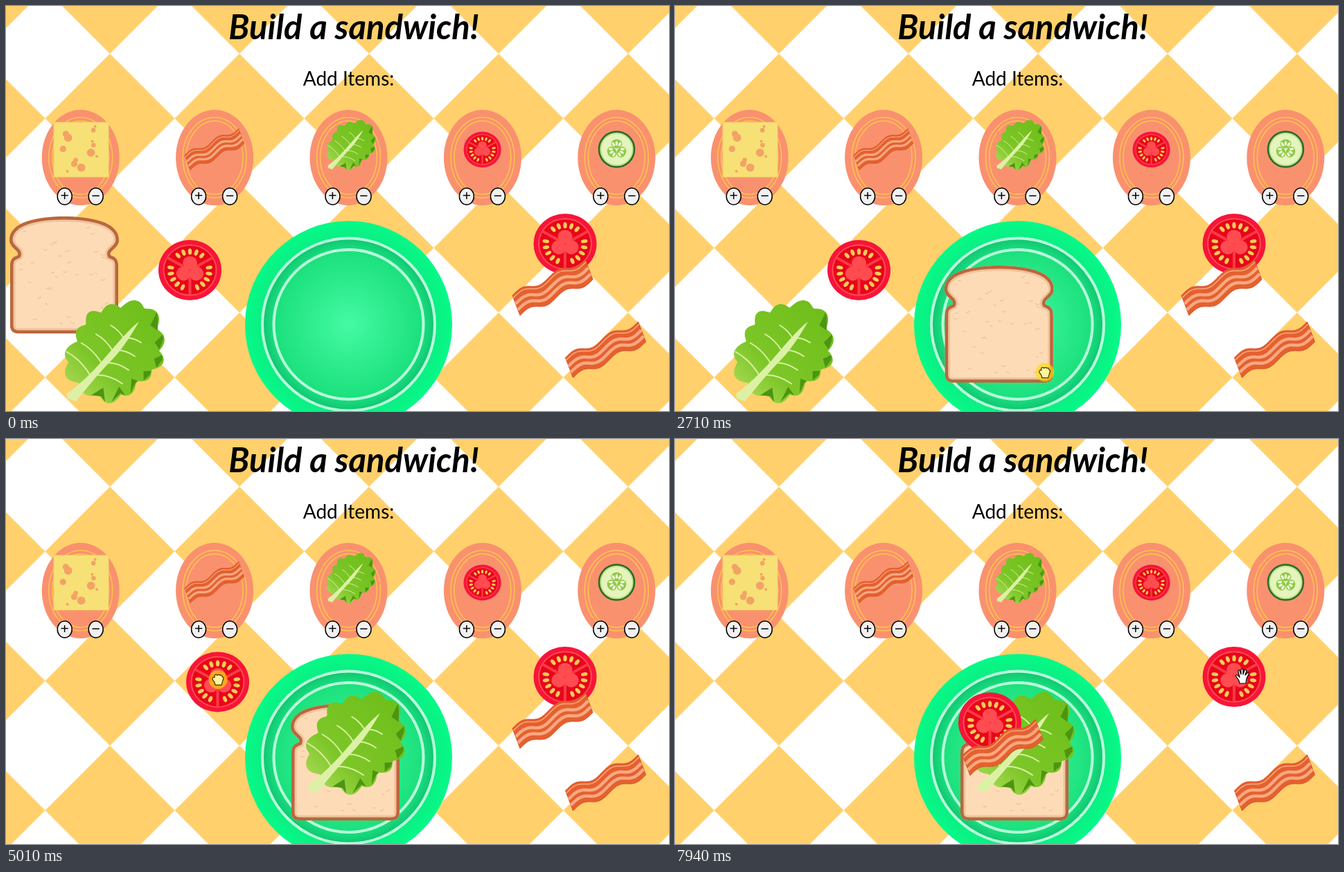
Recreate the animation shown at these times as an HTML page. Size 957x585 px, loop 8 s.

```html
<!DOCTYPE html>
<html lang="en">
<head>
<meta charset="utf-8">
<title>Build a sandwich!</title>
<style>
  html, body { margin: 0; width: 100%; height: 100%; overflow: hidden; background: #fff; }
  svg { display: block; width: 100%; height: 100%; }
  text { font-family: Lato, "Open Sans", sans-serif; text-anchor: middle; }
  .title { font-size: 49px; font-weight: 700; font-style: italic; }
  .sub { font-size: 28px; }
  .sign { font: 21px "Liberation Sans", Arial, sans-serif; }
</style>
</head>
<body>
<svg viewBox="0 0 957 585">
  <defs>
    <pattern id="tiles" x="56.5" y="68.9" width="187" height="187" patternUnits="userSpaceOnUse">
      <path d="M93.5 0L187 93.5 93.5 187 0 93.5Z" fill="#ffd06b"/>
    </pattern>
    <radialGradient id="rim">
      <stop offset=".84" stop-color="#0cee83"/>
      <stop offset="1" stop-color="#05fa88"/>
    </radialGradient>
    <radialGradient id="band">
      <stop offset=".86" stop-color="#19e07f"/>
      <stop offset="1" stop-color="#10c571"/>
    </radialGradient>
    <radialGradient id="dish">
      <stop offset="0" stop-color="#45faa4"/>
      <stop offset="1" stop-color="#1be07c"/>
    </radialGradient>
    <linearGradient id="leafFill" x1="0" y1="1" x2="1" y2="0">
      <stop offset="0" stop-color="#b5df62"/>
      <stop offset=".35" stop-color="#7dc628"/>
      <stop offset="1" stop-color="#6cbd18"/>
    </linearGradient>
    <path id="loaf" d="M79 0C118 0 158 8 158 34C158 46 143 49 146 56C154 59 157 62 157 72V157Q157 169 145 169H13Q1 169 1 157V72C1 62 4 59 12 56C15 49 0 46 0 34C0 8 40 0 79 0Z"/>
    <clipPath id="loafClip"><use href="#loaf"/></clipPath>

    <g id="bread">
      <g clip-path="url(#loafClip)">
        <use href="#loaf" fill="#fddbb6" stroke="#efc39c" stroke-width="15"/>
        <use href="#loaf" fill="none" stroke="#b9673f" stroke-width="9"/>
      </g>
      <path id="crumbs" fill="none" stroke="#e9c596" stroke-width="1.2" stroke-linecap="round"/>
    </g>

    <g id="lettuce">
      <path id="leaf" fill="url(#leafFill)"/>
      <path id="folds" fill="#4d9412"/>
      <path id="veins" fill="none" stroke="#d9f0a2" stroke-width="2" stroke-linecap="round"/>
      <path d="M2 132Q30 112 62 74T106 28Q84 66 66 84T15 143L3 139Z" fill="#dcf1a6"/>
    </g>

    <g id="bacon">
      <path id="rasher" fill="#e5602f" stroke="#d85429"/>
      <g id="fat" fill="none" stroke="#f8a881"/>
    </g>

    <g id="tomato">
      <ellipse cx="45.5" cy="43.5" rx="45.5" ry="43.5" fill="#f8143a"/>
      <g id="flesh" transform="translate(45.5 43.5) scale(1 .956)">
        <circle r="39" fill="#ff4c50"/>
        <circle r="37" fill="#e8061c"/>
      </g>
    </g>

    <g id="cheese">
      <rect width="79" height="79" fill="#f7e176" stroke="#f5d264"/>
      <g id="holes" fill="#f3a365"/>
    </g>

    <g id="cucumber" transform="translate(27.5 26.5)">
      <circle r="25.5" fill="#b9dc7c" stroke="#286b28" stroke-width="2.5"/>
      <circle r="22.5" fill="#e4f4bd"/>
      <g id="pips"/>
    </g>

    <path id="open" fill="#fff" stroke="#000" stroke-width="1.2" stroke-linejoin="round" d="M-4 11L-5 7-9 1Q-10-2-7-1L-4 2-6-6Q-6-9-4-8L-2-2-2-9Q-1-11 1-9L1-2 3-8Q5-10 6-7L4-1 7-4Q10-5 9-2L6 4 5 11Z"/>
    <g id="fist">
      <circle r="13.5" fill="#ffde00" fill-opacity=".62"/>
      <path fill="#fff3a0" stroke="#3b3000" stroke-width="1.2" stroke-linejoin="round" d="M-4 8L-5 4-8 0Q-8-4-5-3L-5-6Q-3-8-1-6Q1-8 3-6Q6-7 6-4Q9-3 7 1L5 8Z"/>
    </g>
    <path id="arrow" fill="#fff" stroke="#000" d="M0 0V16L4 12.5 7 19 10 18 7 11.5H12Z"/>
  </defs>

  <rect width="957" height="585" fill="#fff"/>
  <rect width="957" height="585" fill="url(#tiles)"/>
  <text class="title" x="502" y="48">Build a sandwich!</text>
  <text class="sub" x="494.5" y="115">Add Items:</text>
  <g id="trays"></g>
  <g transform="translate(494.5 460)" fill="none" stroke="#b9fddb" stroke-width="4">
    <circle r="149.5" fill="url(#rim)" stroke="none"/>
    <circle r="124.5" fill="url(#band)"/>
    <circle r="108" fill="url(#dish)"/>
  </g>
  <g id="food"></g>
  <g id="cursor"><use/></g>
</svg>
<script>
const $ = id => document.getElementById(id);
const fill = (id, html) => $(id).insertAdjacentHTML('beforeend', html);
const shape = (id, d) => $(id).setAttribute('d', d);
const repeat = (n, make) => Array.from({ length: n }, (_, i) => make(i)).join('');
const line = (n, point) => 'M' + Array.from({ length: n + 1 }, (_, i) => point(i / n).map(v => v.toFixed(1))).join('L');

let seed = 11;
const rand = (min, max) => {
  seed = seed * 16807 % 2147483647;
  return min + seed / 2147483647 * (max - min);
};

// Bread and cheese
shape('crumbs', repeat(36, () =>
  `M${rand(14, 138)} ${rand(14, 154)}q${rand(1, 3)} ${rand(1, 4)} ${rand(3, 6)} ${rand(-2, 2)}`));
fill('holes', repeat(13, i => `<circle cx="${rand(7, 72)}" cy="${6 + i * 5.4}" r="${2 + i * 5 % 4 * 1.3}"/>`));

// Lettuce: a scalloped outline, longest along the stem's diagonal
const leafPoint = (angle, scale = 1) => {
  const r = scale * (63 + 8 * Math.cos(2 * angle + Math.PI / 2) + 9 * Math.abs(Math.sin(6.5 * angle)) + 3 * Math.sin(5 * angle));
  return [72 + r * Math.cos(angle), 70 + r * Math.sin(angle)];
};
shape('leaf', line(160, k => leafPoint(k * 2 * Math.PI)) + 'Z');
shape('folds', repeat(7, i => {
  const a = i * .42 - .75;
  return `M${leafPoint(a)}L${leafPoint(a + .1, .97)} ${leafPoint(a + .3, .98)} ${leafPoint(a + .12, .8)}Z`;
}));
shape('veins', repeat(4, i => {
  const x = 36 + i * 16, y = 106 - i * 18, reach = 46 - i * 7;
  return `M${x} ${y}q${-reach * .3} ${-reach * .5} ${-reach * .75} ${-reach * .75}` +
    `M${x} ${y}q${reach * .5} ${-reach * .1} ${reach} ${reach * .25}`;
}));

// Bacon: waves running along a slanted strip, v across it
const wave = v => u => [105 * u + 11 * v, 52 * (1 - u) + 29 * v - 4.5 * Math.sin(4 * Math.PI * u)];
shape('rasher', line(30, wave(0)) + line(30, u => wave(1)(1 - u)).replace('M', 'L') + 'Z');
fill('fat', repeat(3, i => `<path d="${line(30, wave(.12 + i * .3))}" stroke-width="${i ? 4.5 : 1.5}"/>`));

// Tomato and cucumber share a threefold pattern
const thirds = make => repeat(3, i => `<g transform="rotate(${i * 120})">${make()}</g>`);
const fan = (n, step, radius, rx, ry, color) => repeat(n, i =>
  `<ellipse cy="${-radius}" rx="${rx}" ry="${ry}" fill="${color}" transform="rotate(${(i - (n - 1) / 2) * step})"/>`);
fill('flesh', thirds(() => `<path d="M0 0L-32.5 -18.8" stroke="#fb3a45" stroke-width="4"/>`) +
  thirds(() => `<ellipse cy="-11" rx="10.5" ry="10" fill="#ff4c50"/>` + fan(5, 19, 28, 2.7, 4.8, '#f7cb58')));
fill('pips', thirds(() => `<ellipse cy="-8" rx="8" ry="6.5" fill="#8fc94a"/>` + fan(3, 32, 8.5, 1.7, 3.2, '#f2fad8')));

// Trays: ingredient, top left corner, scale
const trays = [['cheese', 69, 168, 1], ['bacon', 258, 177, .74], ['lettuce', 463.5, 166, .49],
  ['tomato', 660.5, 181.5, .595], ['cucumber', 854, 180.5, 1]];
const button = (x, sign) => `<ellipse cx="${x}" cy="275" rx="10.5" ry="12" fill="#f1f1f1" stroke="#000" stroke-width="1.5"/>
  <text class="sign" x="${x}" y="281">${sign}</text>`;
fill('trays', trays.map(([name, x, y, scale], i) => {
  const cx = 107.7 + i * 193.4;
  const ring = (rx, ry, paint) => `<ellipse cx="${cx}" cy="219" rx="${rx}" ry="${ry}" ${paint}/>`;
  const thin = 'fill="none" stroke="#ffc44f" stroke-width="1.5"';
  return ring(56, 69, 'fill="#f9916f"') + ring(46, 58, thin) + ring(41, 53, thin) +
    `<use href="#${name}" transform="translate(${x} ${y}) scale(${scale})"/>` +
    button(cx - 23, '+') + button(cx + 22, '−');
}).join(''));

// Loose food, bottom to top
const item = (name, x, y, w, h) => ({ name, x, y, w, h });
const bread = item('bread', 5, 304, 158, 169);
const lettuce = item('lettuce', 86, 428, 142, 143);
const tomato = item('tomato', 220, 338, 91, 87);
const bacon = item('bacon', 731, 366, 116, 81);
const items = [bread, lettuce, tomato, { ...tomato, x: 761.5, y: 300 }, bacon, { ...bacon, x: 807.5, y: 456 }];
fill('food', items.map(it => `<use href="#${it.name}"/>`).join(''));
items.forEach((it, i) => it.node = $('food').children[i]);

// Pointer moves: eased from the last point to (x, y), bowed vertically, holding what is dragged
const moves = [];
let last = [331, 42];
function move(start, end, x, y, held, bow = 0) {
  moves.push({ start, end, from: last, to: [x, y], held, bow });
  last = [x, y];
}
move(150, 870, 150, 458);
move(870, 1470, 524, 440, bread, -30);
move(1470, 1790, 463, 443, bread);
move(1790, 2390, 546, 513, bread, -15);
move(2390, 2560, 511, 522, bread);
move(2560, 2860, 556, 536, bread);
move(2860, 3240, 66, 528);
move(3240, 3440, 153.5, 508);
move(3440, 3900, 467.5, 464, lettuce);
move(4000, 4150, 496, 448);
move(4250, 4395, 530, 432, lettuce);
move(4395, 4870, 266, 378);
move(4900, 5330, 508, 400, tomato, -62);
move(5330, 5560, 455, 406, tomato, 9);
move(5715, 6090, 843, 330);
move(6090, 6170, 770, 406);
move(6170, 6800, 502, 484, bacon, -30);
move(6970, 7330, 454, 445, bacon, 20);
move(7400, 7930, 819, 342);

const ease = k => k * k * (3 - 2 * k);

function travel({ start, end, from, to, bow }, t) {
  const k = ease(Math.min(1, Math.max(0, (t - start) / (end - start))));
  return [(to[0] - from[0]) * k, (to[1] - from[1]) * k + bow * 4 * k * (1 - k)];
}

const place = (node, x, y) => node.setAttribute('transform', `translate(${x.toFixed(2)} ${y.toFixed(2)})`);
const cursor = $('cursor');

function draw(t) {
  const now = moves.findLast(m => t >= m.start) || moves[0];
  const next = moves[moves.indexOf(now) + 1];
  const [dx, dy] = travel(now, t);
  const px = now.from[0] + dx, py = now.from[1] + dy;
  // A drag stays gripped through a pause when the next move carries the same thing.
  const gripped = now.held && (t < now.end || next?.held === now.held);
  let look = gripped ? 'fist' : 'arrow';

  for (const it of items) {
    let { x, y } = it;
    for (const m of moves) {
      if (m.held !== it) continue;
      const [mx, my] = travel(m, t);
      x += mx;
      y += my;
    }
    const over = px > x && px < x + it.w && py > y && py < y + it.h;
    if (over && !gripped) look = 'open';
    place(it.node, x, y);
  }
  cursor.style.display = t < 150 ? 'none' : '';
  cursor.firstChild.setAttribute('href', '#' + look);
  place(cursor, px, py);
}

const began = performance.now();
function tick() {
  draw((performance.now() - began) % 8000);
  requestAnimationFrame(tick);
}
tick();
</script>
</body>
</html>
```
